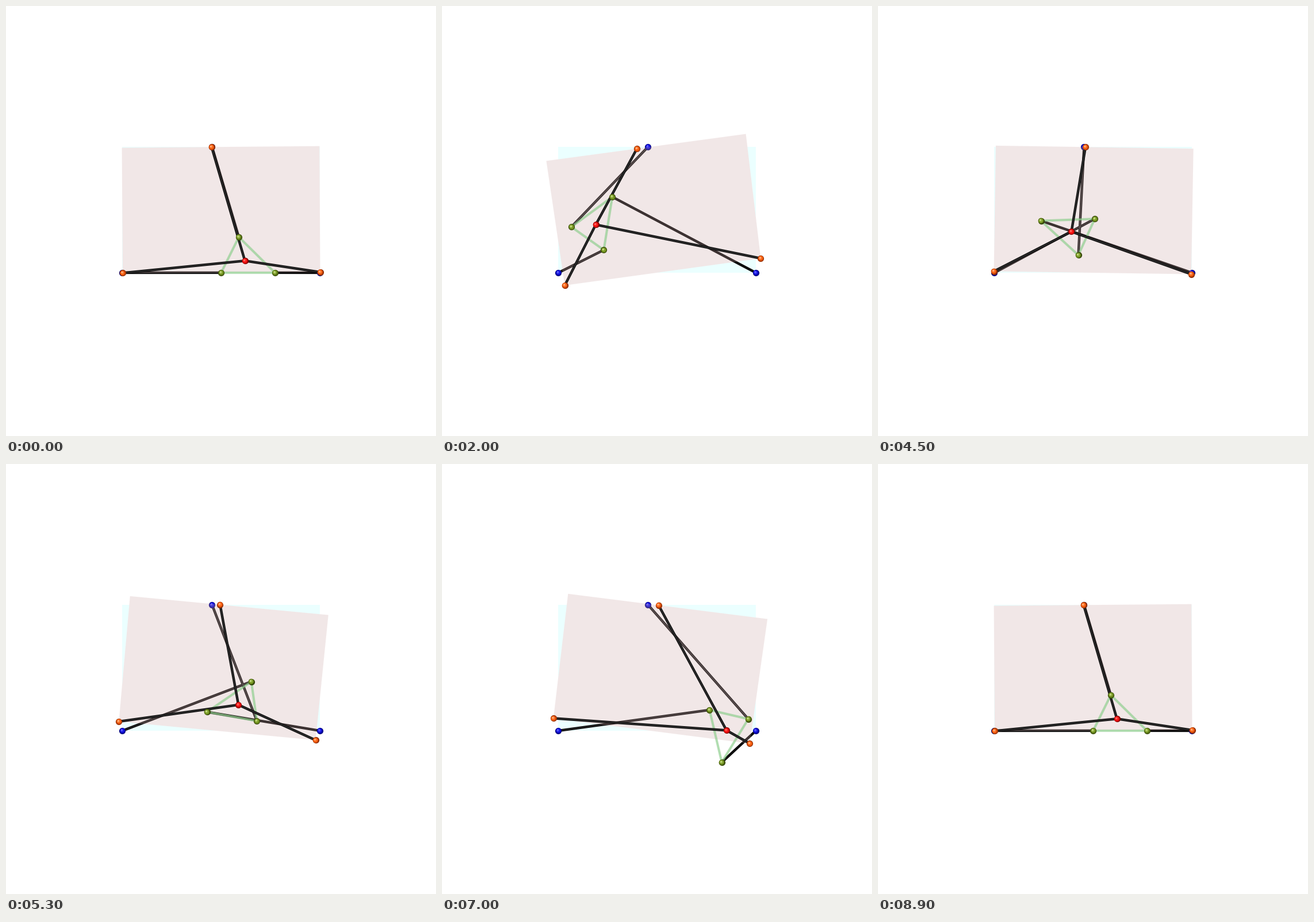
A matplotlib script that plays this animation: 748x748 px, repeating every 9 s.

```python
import numpy as np
import matplotlib.pyplot as plt
from matplotlib.animation import FuncAnimation
from matplotlib.patches import Polygon

SIZE, DPI, FRAMES = 748, 100, 90
PX = 72 / DPI

# Base plate and its three anchors (left, right, top)
BASE = np.array([[202, 244.5], [545.5, 244.5], [545.5, 463.5], [202, 463.5]])
TOP_SPLIT = 0.454

# Moving triangle relative to its centroid, as x + iy with y down
TRI = np.array([-41.3 + 20.7j, 52.2 + 20.7j, -10.6 - 41.3j])

# Upper plate: corner positions (TL, TR, BR, BL) at a few steps of the turn
POSE_STEPS = np.array([0, 20, 36, 45, 62, 78])
POSES = np.array([
    [201, 246, 545, 243.3, 546, 462.5, 202.5, 464],
    [181, 269, 528, 222, 554, 438.5, 213, 485.5],
    [190, 259, 535, 231.5, 551, 449, 208, 477],
    [204.5, 242.5, 548, 247.5, 544.5, 466, 201, 461],
    [220.5, 223, 567.5, 271, 534, 487.5, 193, 440],
    [213, 232.5, 558, 260, 539, 478, 196, 449.5],
])


def turn(step):
    return 2 * np.pi * step / (FRAMES - 1)


def harmonics(t):
    c, s = np.cos(t), np.sin(t)
    return np.stack([np.ones_like(c), c, s, c * s, s * s], axis=-1)


COEF = np.linalg.lstsq(harmonics(turn(POSE_STEPS)), POSES, rcond=None)[0]


def plate_at(t):
    return (harmonics(np.asarray(t)) @ COEF).reshape(4, 2)


def anchors(plate):
    tl, tr, br, bl = plate
    return np.array([bl, br, tl + TOP_SPLIT * (tr - tl)])


def triangle_at(t):
    c, s = np.cos(t), np.sin(t)
    hub = complex(373.5 + 41.6 * c - 114.5 * s, 416.6 + 26.1 * c - 41.4 * s)
    pts = hub + TRI * np.exp(-1j * t)
    return np.array([hub.real, hub.imag]), np.column_stack([pts.real, pts.imag])


def rgb(*v):
    return tuple(np.array(v) / 255)


fig = plt.figure(figsize=(SIZE / DPI, SIZE / DPI), dpi=DPI, facecolor="white")
ax = fig.add_axes([0, 0, 1, 1])
ax.set_xlim(-0.5, SIZE - 0.5)
ax.set_ylim(SIZE - 0.5, -0.5)
ax.axis("off")


def add_plate(color, z, alpha=1):
    return ax.add_patch(Polygon(BASE, closed=True, fc=color, ec="none",
                                lw=0, alpha=alpha, zorder=z))


class Rod:
    """A thin cylinder: dark edges and a lighter core."""

    def __init__(self, edge, core, z, width=4.4, alpha=1):
        self.lines = [
            ax.plot([], [], color=col, lw=w * PX, alpha=alpha, zorder=z + dz,
                    solid_capstyle="butt")[0]
            for col, w, dz in ((edge, width, 0), (core, width * 0.45, 0.01))]

    def place(self, p, q):
        for line in self.lines:
            line.set_data([p[0], q[0]], [p[1], q[1]])


class Balls:
    """Shaded spheres, lit from the upper left."""

    def __init__(self, dark, base, light, z, r=5.6, layers=7):
        self.parts = []
        dark, base, light = map(np.array, (dark, base, light))
        for k in range(layers):
            u = k / (layers - 1)
            if u < 0.5:
                col = dark + (base - dark) * min(1, u * 2.6)
            else:
                col = base + (light - base) * (2 * u - 1) ** 1.5
            size = r * (1 - 0.82 * u)
            art = ax.scatter([], [], s=(2 * size * PX) ** 2, color=[col],
                             linewidths=0, zorder=z + k * 0.01)
            self.parts.append((art, np.array([-1.5, -1.6]) * u))

    def place(self, pts):
        for art, shift in self.parts:
            art.set_offsets(np.atleast_2d(pts) + shift)


add_plate(rgb(235, 255, 255), 1)
cover = add_plate("white", 2)
low_rods = [Rod(rgb(0, 0, 0), rgb(g, g, g), 3) for g in (38, 18, 54)]
blue = Balls(rgb(0, 0, 110), rgb(16, 16, 228), rgb(120, 120, 255), 4)
tint = add_plate(rgb(203, 163, 163), 5, 0.25)
sides = [Rod(rgb(120, 195, 120), rgb(160, 220, 160), 6, 4.2, 0.5)
         for _ in range(3)]
top_rods = [Rod(rgb(12, 12, 12), rgb(44, 44, 44), 7) for _ in range(3)]
green = Balls(rgb(52, 70, 8), rgb(122, 156, 36), rgb(214, 232, 150), 8)
red = Balls(rgb(130, 0, 0), rgb(250, 18, 18), rgb(255, 130, 120), 9)
orange = Balls(rgb(140, 42, 0), rgb(252, 98, 18), rgb(255, 195, 150), 10)

feet = anchors(BASE)
blue.place(feet)


def draw(step):
    t = turn(step)
    plate = plate_at(t)
    heads = anchors(plate)
    hub, tri = triangle_at(t)
    cover.set_xy(plate)
    tint.set_xy(plate)
    for i in range(3):
        low_rods[i].place(feet[i], tri[i])
        sides[i].place(tri[i], tri[(i + 1) % 3])
        top_rods[i].place(heads[i], hub)
    green.place(tri)
    red.place(hub)
    orange.place(heads)
    return []


anim = FuncAnimation(fig, draw, frames=FRAMES, init_func=lambda: draw(0),
                     interval=100, repeat=True, repeat_delay=0, blit=False)
plt.show()
```
